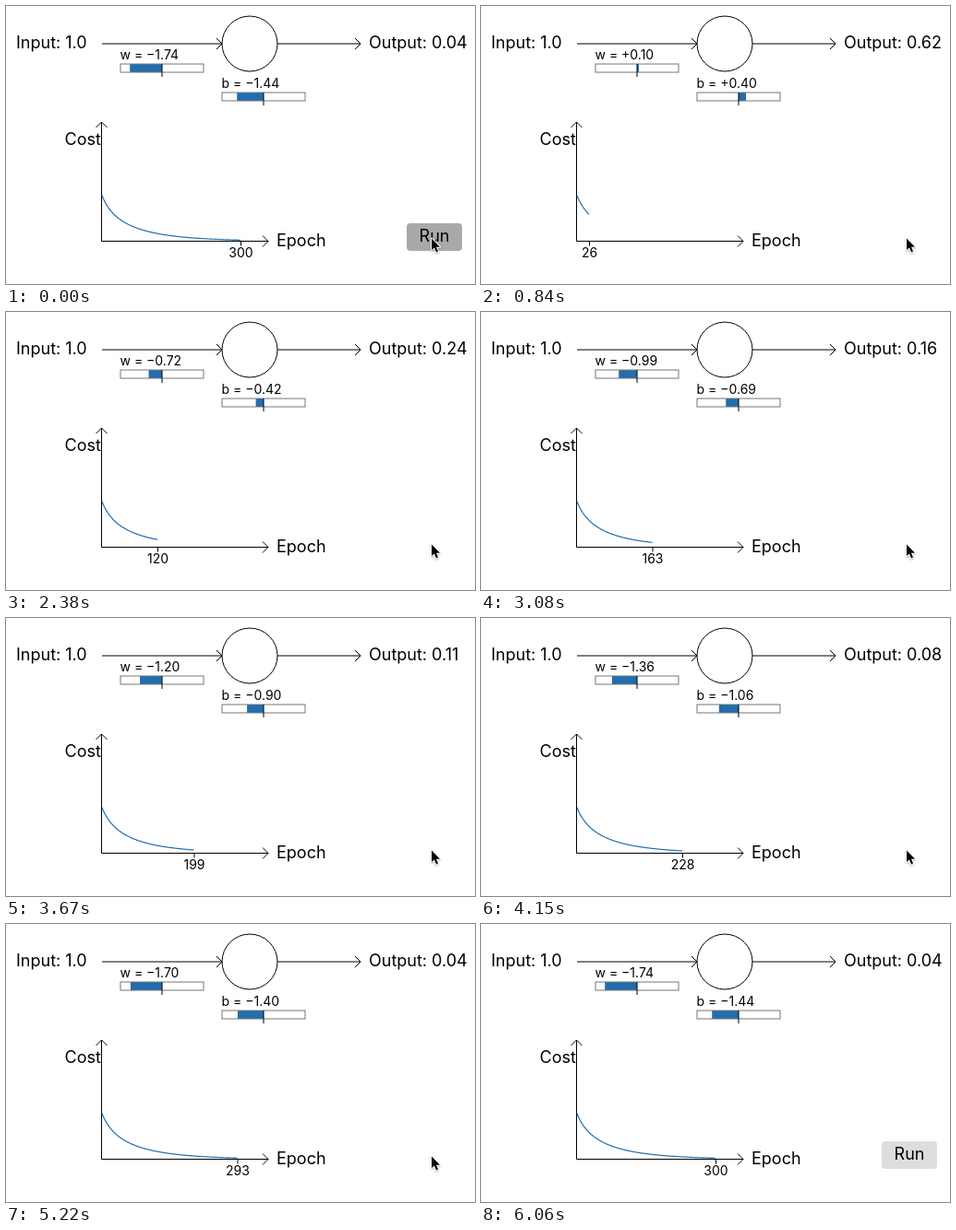
These frames come from a looping animation (508x302 px, 6.44 s). An HTML page with a canvas:

```html
<!DOCTYPE html>
<html lang="en">
<head>
<meta charset="utf-8">
<title>Single neuron learning</title>
<style>
  html, body { margin: 0; width: 100%; height: 100%; overflow: hidden; background: #fff; }
  canvas { display: block; }
</style>
</head>
<body>
<canvas width="508" height="302"></canvas>
<script>
const canvas = document.querySelector('canvas');
const ctx = canvas.getContext('2d');
const LOOP = 6440, START = 468, STEP = 118.5, LAST_STEP = 41, EPOCHS = 300;
const BLUE = '#216daf', BLACK = '#000', GREY = '#777';

// Gradient descent on one sigmoid neuron with input 1 and target 0.
const RATE = 0.005;
const history = [];
for (let i = 0, w = 0.6, b = 0.9; i <= EPOCHS; i++) {
  const step = RATE * (1 + Math.exp(w + b));
  w -= step;
  b -= step;
  const output = 1 / (1 + Math.exp(-w - b));
  history.push({ w, b, output, cost: -Math.log(1 - output) });
}

function path(points, color = BLACK, width = 1, close = false) {
  ctx.beginPath();
  for (const [x, y] of points) ctx.lineTo(x, y);
  if (close) ctx.closePath();
  ctx.strokeStyle = color;
  ctx.lineWidth = width;
  ctx.stroke();
}

function text(str, x, y, size = 18, align = 'left') {
  ctx.font = `${size}px Inter, "Liberation Sans", sans-serif`;
  ctx.textAlign = align;
  ctx.fillStyle = BLACK;
  ctx.fillText(str, x, y);
}

function arrow(x1, y1, x2, y2) {
  path([[x1, y1], [x2, y2]]);
  path(x1 === x2
    ? [[x2 - 6, y2 + 6], [x2, y2], [x2 + 6, y2 + 6]]
    : [[x2 - 6, y2 - 6], [x2, y2], [x2 - 6, y2 + 6]]);
}

function slider(name, value, x, y) {
  const mid = x + 45;
  text(`${name} = ${value < 0 ? '−' : '+'}${Math.abs(value).toFixed(2)}`, x - 0.5, y - 5, 14);
  ctx.fillStyle = BLUE;
  ctx.fillRect(mid, y, value * 20, 9);
  ctx.lineWidth = 1;
  ctx.strokeStyle = GREY;
  ctx.strokeRect(x, y, 90, 9);
  path([[mid, y], [mid, y + 14]]);
}

function costGraph(epoch) {
  const left = 103.5, base = 255.5;
  const x = i => left + 0.5 + i / 2;
  arrow(left, base, left, 126);
  arrow(left, base, 284, base);
  text('Cost', 63.5, 151);
  text('Epoch', 293, 261);
  path(history.slice(0, epoch + 1).map((s, i) => [x(i), base - 30 * s.cost]), BLUE, 1.2);
  const tick = x(epoch) + 0.5;
  path([[tick, base], [tick, base + 5]]);
  text(epoch, tick, 273, 14, 'center');
}

function button(color) {
  ctx.fillStyle = color;
  ctx.beginPath();
  ctx.roundRect(434, 236, 60, 30, 4);
  ctx.fill();
  text('Run', 464, 256, 18, 'center');
}

function cursor(x, y) {
  ctx.save();
  ctx.translate(x, y);
  ctx.lineJoin = 'round';
  ctx.shadowColor = 'rgba(0,0,0,.3)';
  ctx.shadowBlur = 2;
  ctx.shadowOffsetY = 1;
  path([[0, 0], [0, 12.5], [2.9, 9.9], [5.1, 15], [7, 14.1], [5, 9.2], [9, 9.2]], '#fff', 2, true);
  ctx.shadowColor = 'transparent';
  ctx.fillStyle = BLACK;
  ctx.fill();
  ctx.restore();
}

function draw(t) {
  const step = Math.min(Math.floor((t - START) / STEP), LAST_STEP);
  const epoch = step < 0 ? EPOCHS : Math.min(EPOCHS, Math.floor(5.05 + 7.2 * step));
  const { w, b, output } = history[epoch];

  ctx.fillStyle = '#fff';
  ctx.fillRect(0, 0, canvas.width, canvas.height);

  text('Input: 1.0', 11, 46);
  text(`Output: ${output.toFixed(2)}`, 393, 46);
  arrow(104, 41, 234, 41);
  arrow(294, 41, 384, 41);
  ctx.beginPath();
  ctx.arc(264, 41, 30, 0, 2 * Math.PI);
  ctx.stroke();
  slider('w', w, 124, 63);
  slider('b', b, 234, 94);
  costGraph(epoch);

  // The button hides while training; the pointer then leaves downwards.
  if (step < 0 || step === LAST_STEP) button(t < 5940 ? '#a9a9a9' : '#ddd');
  if (t < 5820) cursor(461, 252.5);
  else if (t < 5940) cursor(463, 258);
  else if (t < 6060) cursor(467, 285);
}

function tick() {
  draw(performance.now() % LOOP);
  requestAnimationFrame(tick);
}
tick();
</script>
</body>
</html>
```
